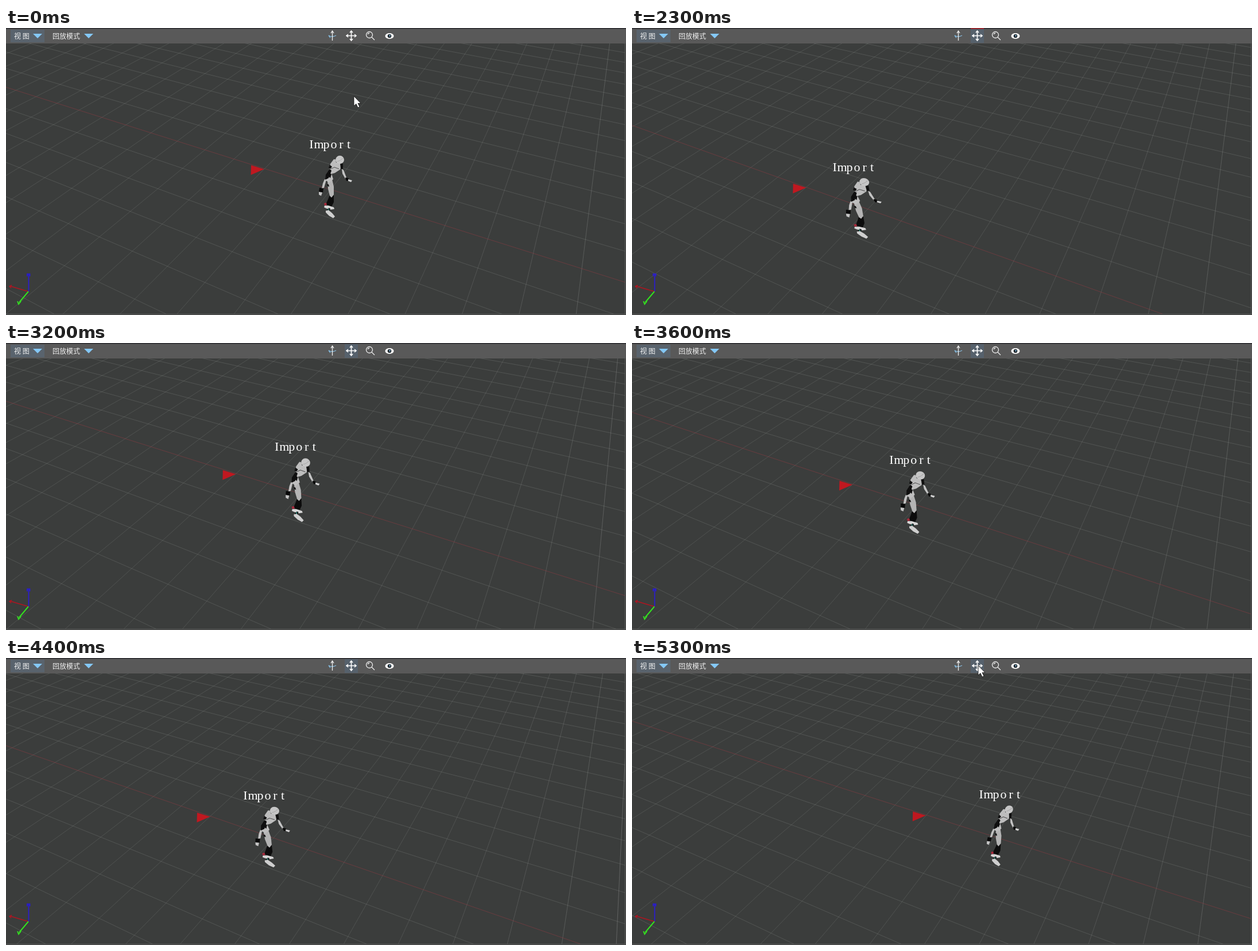
Animation, 1080 px wide and 501 px high, one loop 6000 ms. Source, as an HTML page:

```html
<!DOCTYPE html>
<html lang="zh">
<head>
<meta charset="utf-8">
<title>Viewport pan</title>
<style>
html, body { margin: 0; width: 100%; height: 100%; overflow: hidden; background: #3b3d3c; }
svg { display: block; width: 100vw; height: 100vh; }
.ui { font: 12px "Noto Sans CJK SC", "Noto Sans CJK", sans-serif; fill: #f0f0f0; }
.tag { font: 22px "Liberation Serif", serif; fill: #fff; text-anchor: middle; }
</style>
</head>
<body>
<svg viewBox="0 0 1080 501" preserveAspectRatio="none">
  <defs><clipPath id="view"><rect y="27" width="1078" height="472"/></clipPath></defs>
  <rect width="1080" height="501" fill="#3b3d3c"/>
  <g clip-path="url(#view)">
    <g id="grid" stroke="#c8cac8" stroke-width="1"></g>
    <path id="axis" stroke="#a83a44" stroke-opacity=".42"/>
    <path id="arrow" d="M427 239.5L449.500 246.500L426.500 256.500Z" fill="#c01820"/>
    <g id="figure">
      <path d="M565 289l6 3 0 12-4 8-5 9-3-2 3-9-5-2 4-9z" fill="#0c0c0c"/>
      <path d="M555 310l7 0 9 3 1 3-6 1-8-2-4-2z" fill="#d6d6d6"/>
      <path d="M554 306l4-1 1 4-4 1z" fill="#a82a3c"/>
      <path d="M562 314l3 1-2 5-3-1z" fill="#141818"/>
      <path d="M561 315l1.500 0 0 4-2 1z" fill="#2c7a70"/>
      <path d="M557 319l5-1 6 5 5 6-3 3-7-4-6-6z" fill="#cfcfcf"/>
      <path d="M560 266l8-2 3 13 0 14-4 5-3-3-3-12z" fill="#b4b4b4"/>
      <path d="M558 256l9-2 3 10-7 6-6-4z" fill="#bebebe"/>
      <path d="M561 249l7 3-3 10-3-3z" fill="#111"/>
      <path d="M559 272l3 1 1 4-3-1z" fill="#151515"/>
      <path d="M571 229l6 1 8 10-3 7-9 6-7 2-3-6 2-12z" fill="#bdbdbd"/>
      <path d="M566 246l6-3 8 3" fill="none" stroke="#4c4c4c"/>
      <path d="M564 246l3 3-5 13-6 3 1-9z" fill="#0f0f0f"/>
      <path d="M564 239l4 3-3 4-3-2z" fill="#111"/>
      <path d="M555 264l3 1-4 14-4 1 2-9z" fill="#c0c0c0"/>
      <path d="M546 279l7 1-1 7-7 0z" fill="#080808"/>
      <path d="M545 286l6 1-2 6-4-2z" fill="#c4c4c4"/>
      <path d="M582 236l5 1 0 9-4 0z" fill="#101010"/>
      <path d="M585 246l3 2 5 13-2 2-5-9z" fill="#c4c4c4"/>
      <path d="M591 261l5 1 2 4-5 1z" fill="#080808"/>
      <path d="M596 264l7 2-2 3-5-2z" fill="#d2d2d2"/>
      <path d="M574 228l4-3 1 10-4 0z" fill="#2a2a2a"/>
      <ellipse cx="581.500" cy="230" rx="7.500" ry="7.200" fill="#c6c6c6"/>
      <path d="M577 233q6-1 10-6" fill="none" stroke="#a8a8a8"/>
    </g>
    <text id="tag" class="tag" x="532 545 558 571 584 597" y="210">Import</text>
    <g fill="none" stroke-width="1.500">
      <path d="M39.500 460V430M37 433.500v-4h4.500v4" stroke="#2a1cd0" stroke-width="1.800"/>
      <path d="M39 460L7 450.500M10 449l-4 2 3 3" stroke="#b01420"/>
      <path d="M39 460L23 479M20 477l2 5 4-5" stroke="#34e020" stroke-width="2"/>
    </g>
  </g>
  <path d="M1078.500 27V500M0 499.500H1080" stroke="#5c5d5c" fill="none"/>
  <rect width="1080" height="27" fill="#595959"/>
  <rect width="1080" height="1.500" fill="#2a2a2e"/>
  <rect x="8" y="3" width="59" height="22" fill="#59636d"/>
  <text class="ui" x="14" y="19">视 图</text>
  <text class="ui" x="81" y="19">回放模式</text>
  <path d="M47 10h16l-8 8zM136 10h16l-8 8z" fill="#84c8f6"/>
  <rect id="hover" x="590" y="2" width="23" height="24" fill="#56616c"/>
  <rect id="mark" x="590" y="0" width="23" height="1.500" fill="#b02028"/>
  <g fill="none" stroke="#eee" stroke-width="1.300">
    <path d="M562 13q6 4 13 0M565 17l-3-4" stroke="#86bce0"/>
    <path d="M568.500 22V6M566 9l2.500-4 2.500 4"/>
    <path d="M593 13.500h17M601.500 5v17M596 11l-3 2.500 3 2.500M607 11l3 2.500-3 2.500M599 8l2.500-3 2.500 3M599 19l2.500 3 2.500-3" stroke="#fff" stroke-width="1.600"/>
    <circle cx="633" cy="12" r="5.500"/>
    <path d="M637 16l5 5M630 11q1-2 3-2"/>
  </g>
  <path id="press" d="M597 10h8v7h-8z" fill="#c82030"/>
  <ellipse cx="668" cy="14" rx="7.500" ry="5" fill="#fff"/>
  <circle cx="668" cy="14" r="3.300" fill="#20282e"/>
  <circle cx="668.500" cy="13.500" r="1.200" fill="#7fb4d8"/>
  <path id="cursor" d="M0 0V17L4 13.500L7 20L10 18.500L7 12.500H12Z" fill="#fff" stroke="#111" stroke-width=".8"/>
</svg>
<script>
const $ = id => document.getElementById(id);
const LOOP = 6000, STEP = 100;

// Camera: focal length, distance, yaw and pitch; one grid cell is one unit.
const CX = 540, CY = 263, FOCAL = 880, UNIT = 67, DIST = FOCAL / UNIT;
const SIN_A = 0.454, COS_A = 0.891, SIN_P = 0.61, COS_P = 0.792;
const PHASE = 0.74, NEAR = 3;

// Pan in pixels at the camera distance: [time, x, y]
const pans = [
  [1400, 0, 0], [2300, -154, 34], [2800, -53.4, -25.8],
  [3600, -69, 1], [4400, -99, 32], [5300, 65.5, 30]
];

function slope(i, k) {
  if (i === 0 || i === pans.length - 1) return 0;
  const a = pans[i - 1], b = pans[i + 1];
  return (b[k] - a[k]) / (b[0] - a[0]);
}

function panAt(t) {
  const last = pans.length - 1;
  if (t <= pans[0][0]) return [0, 0];
  if (t >= pans[last][0]) return pans[last].slice(1);
  const i = pans.findIndex(p => p[0] > t) - 1;
  const a = pans[i], b = pans[i + 1], span = b[0] - a[0];
  const u = (t - a[0]) / span, v = 1 - u;
  return [1, 2].map(k =>
    a[k] * v * v * (1 + 2 * u) + b[k] * u * u * (3 - 2 * u) +
    span * u * v * (slope(i, k) * v - slope(i + 1, k) * u));
}

function project(x, y, [px, py]) {
  const away = SIN_A * x - COS_A * y;
  const s = DIST / (DIST + away * COS_P);
  return [
    CX + s * (10 + px - UNIT * (COS_A * x + SIN_A * y)),
    CY + s * (14 + py - UNIT * away * SIN_P)
  ];
}

const reach = (DIST - NEAR) / COS_P;
const alongX = (y, pan) =>
  [project((COS_A * y - reach) / SIN_A, y, pan), project(60, y, pan)];
const alongY = (x, pan) =>
  [project(x, -50, pan), project(x, (reach + SIN_A * x) / COS_A, pan)];
const toPath = ends => "M" + ends.map(p => p.map(v => v.toFixed(2))).join("L");

const lines = [];
function addLine(fn, at) {
  const el = document.createElementNS("http://www.w3.org/2000/svg", "path");
  $("grid").append(el);
  lines.push({ el, fn, at });
}
for (let y = -20; y <= 16; y++) if (y) addLine(alongX, y);
for (let n = -13; n <= 26; n++) addLine(alongY, n + PHASE);

const show = (id, on) => $(id).setAttribute("visibility", on ? "visible" : "hidden");
const shift = (id, x, y) => $(id).setAttribute("transform", `translate(${x} ${y})`);

function draw(now) {
  const t = Math.floor((now % LOOP) / STEP) * STEP;
  const pan = panAt(t), [px, py] = pan;

  for (const { el, fn, at } of lines) {
    const ends = fn(at, pan);
    el.setAttribute("d", toPath(ends));
    let alpha = 0.16;
    if (fn === alongY) {
      const [a, b] = ends;
      alpha = 0.14 + 0.17 * Math.exp(-7 * Math.abs((b[0] - a[0]) / (b[1] - a[1])));
    }
    el.setAttribute("stroke-opacity", alpha.toFixed(3));
  }
  $("axis").setAttribute("d", toPath(alongX(0, pan)));
  shift("arrow", px * 0.95, py * 0.95);
  shift("tag", px * 1.162, py * 1.162);

  // Parts nearer the camera (higher, or further left) shift further.
  const gx = -0.0008, gy = -0.00105, g = 1.058 - gx * 565 - gy * 328;
  $("figure").setAttribute("transform",
    `matrix(${1 + px * gx} ${py * gx} ${px * gy} ${1 + py * gy} ${px * g} ${py * g})`);

  const u = Math.min(1, Math.max(0, (t - 500) / 700));
  const e = u * u * (3 - 2 * u);
  shift("cursor", 606 - 3 * e, 119 - 106 * e);
  show("cursor", t <= 1400 || t >= 5300);
  show("hover", t >= 1200);
  show("press", t === 1400);
  show("mark", t >= 1500 && t < 2500);
}

const start = performance.now();
function tick() {
  draw(performance.now() - start);
  requestAnimationFrame(tick);
}
tick();
</script>
</body>
</html>
```
